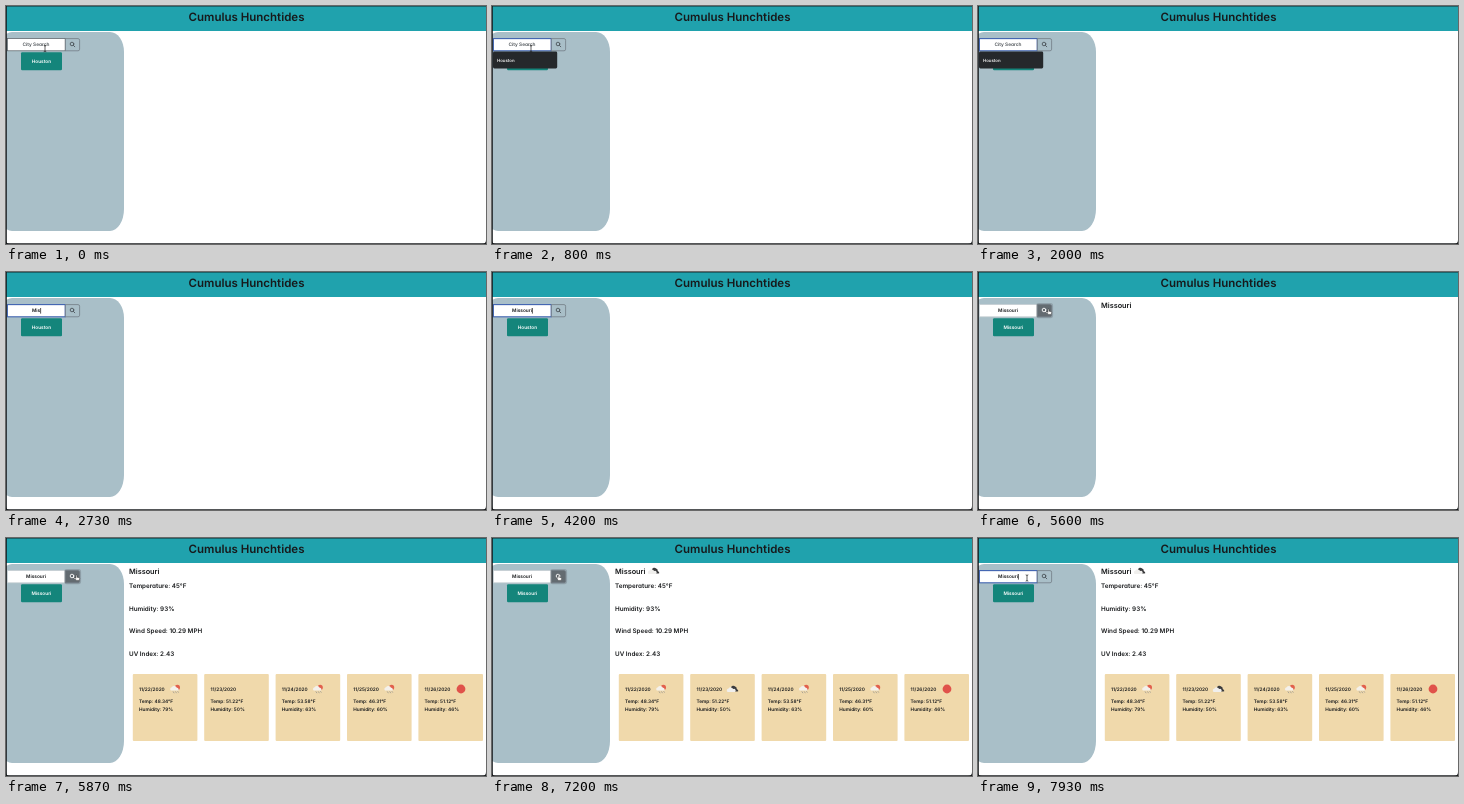
These frames come from a looping animation (480 px wide and 238 px high, 8 s). An HTML page:

```html
<!DOCTYPE html>
<html lang="en">
<head>
<meta charset="utf-8">
<title>Weather dashboard</title>
<style>
  html, body { margin: 0; width: 100%; height: 100%; overflow: hidden; background: #fff; }
  svg { display: block; width: 480px; height: 238px; }
  text {
    font-family: Inter, "Open Sans", sans-serif;
    font-weight: 600;
    font-feature-settings: "cv11";
    text-rendering: geometricPrecision;
    fill: #17191b;
  }
  .mid { text-anchor: middle; }
  .small { font-size: 4.75px; }
  .fact { font-size: 6.3px; }
</style>
</head>
<body>
<svg viewBox="0 0 480 238">
  <defs>
    <g id="rain">
      <circle cx="2" cy="-1.6" r="2.6" fill="#e2604c"/>
      <path d="M-4.6 1.6a2 2 0 0 1 1-3.4a2.8 2.8 0 0 1 5 .6a1.8 1.8 0 0 1 1.6 2.8z" fill="#f4f1ec"/>
      <path d="M-2.4 2.4l1.2 1.8M0 2.4l1.2 1.8M2.2 2.2l1 1.4" stroke="#8c8a88" stroke-width=".7"/>
    </g>
    <g id="sun"><circle r="4.4" fill="#e0524a"/></g>
    <g id="cloud">
      <path d="M-1.6 -1.4a2.4 2.4 0 0 1 4.2 -1a2 2 0 0 1 1.6 2.2l1.4 1.4a1 1 0 0 1 -1 1.4h-2.6z" fill="#3b3b3d"/>
      <path d="M-4.8 3a1.9 1.9 0 0 1 .8-3.5a2.6 2.6 0 0 1 4.6 .6a1.7 1.7 0 0 1 1.8 2.9z" fill="#f0efed"/>
    </g>
  </defs>

  <rect width="480" height="238" fill="#fff"/>
  <rect width="480" height="25" fill="#20a2ad"/>
  <text class="mid" x="240.5" y="15" font-size="11.5">Cumulus Hunchtides</text>
  <path d="M-8 48A14 22 0 0 1 6 26H104A14 20 0 0 1 118 46V203A14 22 0 0 1 104 225H6A14 22 0 0 1 -8 203Z" fill="#a9bfc8"/>

  <rect x="15" y="46.3" width="41" height="18" rx="1.2" fill="#14857b"/>
  <text id="recent" class="mid small" x="35.4" y="57" style="fill:#fff"></text>

  <rect id="field" x="1.4" y="32.6" width="57.8" height="12.2" fill="#fff"/>
  <text id="query" class="mid small" x="30" y="40.4"></text>
  <path id="caret" stroke="#111" stroke-width=".7"/>

  <rect id="ring" x="58.8" y="31.8" width="15.6" height="13.8" rx="2" fill="none" stroke="#6c757d" stroke-opacity=".4" stroke-width="1.4"/>
  <path id="button" d="M59.4 32.6H72a1.6 1.6 0 0 1 1.6 1.6V43.2a1.6 1.6 0 0 1 -1.6 1.6H59.4z" stroke="#6c757d" stroke-width=".7"/>
  <g id="lens" fill="none" stroke-width=".9" stroke-linecap="round">
    <circle cx="66" cy="38" r="1.8"/>
    <path d="M67.4 39.4l1.4 1.4"/>
  </g>

  <g id="menu">
    <rect x="1" y="45.6" width="64.2" height="16.8" rx="1.4" fill="#25282b"/>
    <text x="5" y="55.8" font-size="4.3" style="fill:#f2f2f2">Houston</text>
  </g>

  <text id="place" x="123" y="35.6" font-size="7.3">Missouri</text>
  <g id="report"></g>
  <g id="late">
    <use href="#cloud" x="161.5" y="33"/>
    <use href="#cloud" x="240.5" y="151"/>
  </g>

  <path d="M0 0H480M.4 0V238M0 237.7H480" stroke="#16191b" stroke-width=".9"/>
  <path d="M0 234V238H4A4 4 0 0 1 0 234M480 234V238H476A4 4 0 0 0 480 234" fill="#16191b"/>

  <path id="beam" d="M-1.3 -3.2Q0 -3.2 0 -2.3Q0 -3.2 1.3 -3.2M0 -2.5V2.5M-1.3 3.2Q0 3.2 0 2.3Q0 3.2 1.3 3.2" fill="none" stroke="#222" stroke-width=".7"/>
  <path id="hand" d="M-1 -2.6q.6 -.7 1 0V-.8l2.2 .5q.6 .2 .5 .9L2.2 2.4H-.6L-2.4 .3q0 -.7 .7 -.5L-1 .4z" fill="#fff" stroke="#222" stroke-width=".4"/>
</svg>
<script>
const LOOP = 8000;
const $ = id => document.getElementById(id);
const el = Object.fromEntries(
  ["recent", "field", "query", "caret", "ring", "button", "lens", "menu", "place", "report", "late", "beam", "hand"]
    .map(id => [id, $(id)]));

const label = (x, y, cls, s) => `<text x="${x}" y="${y}" class="${cls}">${s}</text>`;
const facts = ["Temperature: 45°F", "Humidity: 93%", "Wind Speed: 10.29 MPH", "UV Index: 2.43"];
const days = [
  [22, "48.34", 79, "rain"],
  [23, "51.22", 50, ""],
  [24, "53.58", 63, "rain"],
  [25, "46.31", 60, "rain"],
  [26, "51.12", 46, "sun"]
];
const card = ([day, temp, humid, icon], i) => {
  const x = 126.8 + 71.4 * i;
  return `<rect x="${x}" y="136" width="64.6" height="67" rx="1" fill="#f0d9ab"/>`
    + label(x + 6.2, 152.6, "small", `11/${day}/2020`)
    + label(x + 6.2, 164.9, "small", `Temp: ${temp}°F`)
    + label(x + 6.2, 173, "small", `Humidity: ${humid}%`)
    + (icon ? `<use href="#${icon}" x="${x + 42.6}" y="151"/>` : "");
};
el.report.innerHTML =
  facts.map((s, i) => label(123, 50 + 22.7 * i, "fact", s)).join("") + days.map(card).join("");

const keyTimes = [2200, 2530, 2730, 2930, 3070, 3400, 3600, 3800];
const show = (node, on) => node.setAttribute("visibility", on ? "visible" : "hidden");
const within = (t, ...spans) => spans.some(([a, b]) => t >= a && t < b);

// Pointer glides between the field and the button in 15 fps steps.
function glide(t, start, end, from, to) {
  const step = Math.floor(t * 0.015 + 1e-6) / 0.015;
  const p = Math.min(1, Math.max(0, (step - start) / (end - start)));
  const e = p * p * (3 - 2 * p);
  return from.map((v, i) => v + (to[i] - v) * e);
}
function pointer(t) {
  if (t < 4200) return [39, 42.6];
  if (t < 7000) return glide(t, 4200, 4930, [39, 42.6], [71, 40]);
  return glide(t, 7000, 7730, [71, 40], [49, 40]);
}

function draw(t) {
  const typed = "Missouri".slice(0, keyTimes.filter(k => t >= k).length);
  const focused = within(t, [800, 5200], [7730, LOOP]);
  const [px, py] = pointer(t);
  const over = px > 59;

  el.recent.textContent = t < 5330 ? "Houston" : "Missouri";
  el.query.textContent = typed || "City Search";
  el.query.style.fill = typed ? "#17191b" : "#4a5055";
  el.field.setAttribute("stroke", focused ? "#3f63b0" : over ? "#c5ced2" : "#555c61");
  el.field.setAttribute("stroke-width", focused ? 1.1 : 0.7);

  const cx = 30 + (typed ? el.query.getComputedTextLength() / 2 + 0.5 : 0);
  el.caret.setAttribute("d", `M${cx} 36V41.6`);
  show(el.caret, within(t, [1270, 1735], [2200, 4400], [4930, 5200], [7730, LOOP]));

  show(el.ring, within(t, [5200, 7730]));
  el.button.setAttribute("fill", over ? "#636b71" : "#a9bfc8");
  el.lens.setAttribute("stroke", over ? "#fff" : "#4c555b");

  show(el.menu, within(t, [800, 2200]));
  show(el.place, t >= 5600);
  show(el.report, t >= 5870);
  show(el.late, t >= 6200);

  const awake = t < 1270 || t >= 4267;
  show(el.beam, awake && !over);
  show(el.hand, awake && over);
  for (const node of [el.beam, el.hand]) node.setAttribute("transform", `translate(${px} ${py})`);
}

const begin = performance.now();
function tick() {
  draw((performance.now() - begin) % LOOP);
  requestAnimationFrame(tick);
}
tick();
</script>
</body>
</html>
```
